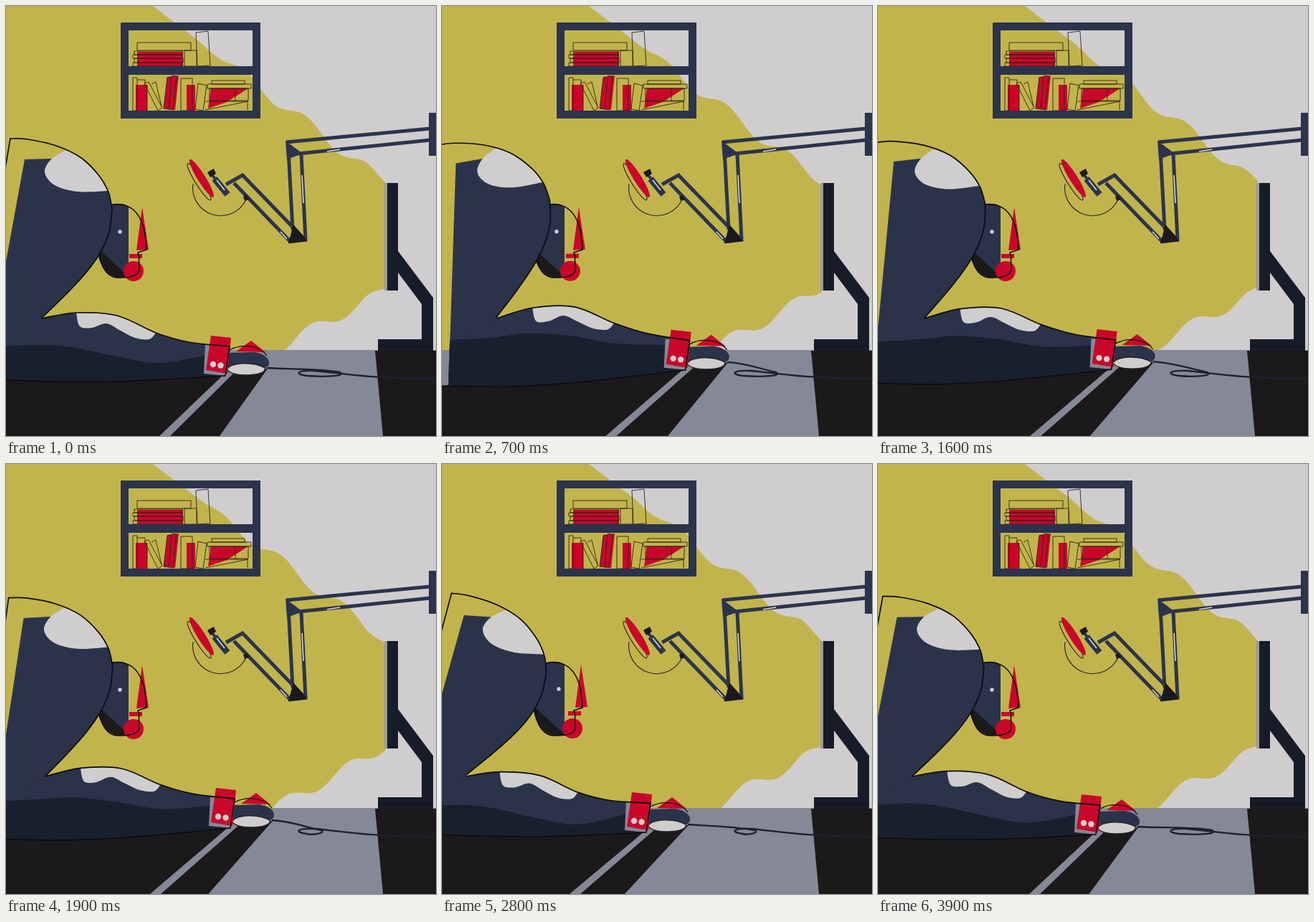
An HTML page that plays this animation: 600 by 600 pixels, repeating every 4000 ms.

```html
<!DOCTYPE html>
<html lang="en">
<head>
<meta charset="utf-8">
<title>Late at the desk</title>
<style>
html, body { margin: 0; width: 100%; height: 100%; overflow: hidden; background: #d0cdcf; }
svg { display: block; width: 100vw; height: 100vh; }
</style>
</head>
<body>
<svg viewBox="0 0 600 600" fill="none">
  <defs><clipPath id="clip"><path id="spine" d="M26 214L-31 524V700H700V0H26Z"/></clipPath></defs>
  <rect width="600" height="600" fill="#d0cdcf"/>
  <path id="glow" fill="#c2b44c"/>

  <!-- shelf and books -->
  <path fill="#c9062a" d="M183 64H247V84H183ZM181 110H197V146H181ZM225 99L241 97L236 145L220 143ZM252 110H264V146H252ZM286 115H338L308 134L282 143Z"/>
  <g stroke="#2a2618" stroke-width=".9">
    <path d="M183 51H258V62H183ZM179 63H246V68H179ZM177 68H246V73H177ZM179 73H247V79H179ZM177 79H246V84H177ZM249 62H266V84H249ZM265 37L282 35L285 83L267 84Z"/>
    <path d="M177 100H183V146H177ZM183 103H194V110M197 110V146M193 108L199 106L218 142L212 146ZM203 109L209 106L217 140M225 100L231 99L227 144L220 143ZM231 97L238 98L233 145L227 144M244 101H260V146H244ZM268 108L280 111L275 146L264 144Z"/>
    <path d="M287 104H333V109H287ZM281 109H342V115H281ZM284 115H338V132H284ZM278 133H337V145M278 145L338 133M320 115V132"/>
  </g>
  <path fill="#2b344c" fill-rule="evenodd" d="M160 23H355V157H160ZM171 34V84H344V34ZM171 96V146H344V96Z"/>

  <!-- lamp -->
  <path d="M261 248A39 39 0 0 0 335 270" stroke="#2b2b32" stroke-width="1.2"/>
  <g stroke="#2b344c" stroke-width="5">
    <path d="M391 190L592 171M408 206L592 187M394 200L400 312M412 207L418 326"/>
    <path d="M329 235L418 327M318 247L397 329M307 249L332 235M394 329L420 326"/>
    <path d="M291 241L309 263" stroke-width="9"/>
    <path d="M286 234L296 246" stroke-width="4"/>
  </g>
  <path fill="#2b344c" d="M590 149H600V209H590ZM390 188L414 206L392 214Z"/>
  <path fill="#1c191b" d="M401 305L421 328L394 331ZM281 232L290 227L293 234L285 239ZM331 266L336 264L339 270L333 272Z"/>
  <path stroke="#d8d6da" stroke-width="1.6" d="M448 203L466 200M413 236L415 275M383 315L392 325M294 243L305 257"/>
  <g transform="rotate(-32 271 242)">
    <ellipse cx="268" cy="244" rx="5" ry="30" stroke="#2b2b32" stroke-width="1.2"/>
    <ellipse cx="273.500" cy="241.500" rx="5.5" ry="31" fill="#c9062a"/>
  </g>

  <!-- desk and monitor -->
  <rect y="480" width="600" height="120" fill="#858896"/>
  <path fill="#1c191b" d="M515 481H600V600H526Z"/>
  <path id="dark" fill="#1c191b"/>
  <path fill="#9a9aa1" d="M528 247H533V397H528Z"/>
  <path fill="#171c28" d="M532 247H547V397H532ZM547 342L596 407V470H580V416L547 372ZM519 465H596V481H519Z"/>
  <path d="M519 475H596" stroke="#10141d" stroke-width="1.5"/>
  <path id="cable" stroke="#1b2130" stroke-width="2.3"/>

  <!-- head -->
  <path fill="#2b334b" d="M140 279C150 275 163 275 171 280V378C150 382 134 372 130 345Z"/>
  <path fill="#1c191b" d="M128 338L172 378C150 382 133 372 128 345Z"/>
  <g id="face" fill="#c9062a">
    <path d="M190 281L199 340L182 341ZM172 346H190V352H172Z"/>
    <circle cx="178" cy="370" r="14"/>
    <circle cx="159" cy="315" r="2.7" fill="#d0cdcf"/>
  </g>
  <path stroke="#0c0c10" stroke-width="1.6" d="M140 280C158 273 186 274 194 318L196 340L184 344L186 350C184 356 187 360 186 368C185 376 176 379 160 379C143 380 132 367 130 343"/>

  <!-- torso, arm and hand -->
  <g id="torso">
    <path id="coat" fill="#2b334b"/>
    <path id="shoulder" fill="#d0cdcf"/>
    <path id="back" stroke="#0c0c10" stroke-width="1.7"/>
  </g>
  <g clip-path="url(#clip)">
    <path id="arm" fill="#2b334b"/>
    <path id="shade" fill="#18202d"/>
  </g>
  <path id="sleeve" fill="#d0cdcf"/>
  <g id="hand">
    <path fill="#2b334b" d="M308 484L345 483C358 484 368 491 367 499C366 506 352 509 340 509L308 508Z"/>
    <path fill="#c9062a" d="M321 482L342 467L362 483Z"/>
    <path fill="#d0cdcf" stroke="#23251f" stroke-width="1.4" d="M308 507C315 497 345 496 361 505C363 511 352 515 335 515C320 515 312 512 308 507Z"/>
    <path stroke="#0c0c10" stroke-width="1.2" d="M312 480C328 471 354 473 364 488"/>
    <path fill="#858896" d="M278 473L312 475L306 516L276 513Z"/>
    <path fill="#c9062a" d="M286 460L314 463L309 513L279 508Z"/>
    <g fill="#d0cdcf"><circle cx="289" cy="500" r="4.2"/><circle cx="299.500" cy="501.500" r="4.2"/></g>
  </g>
  <path id="line" stroke="#0c0c10" stroke-width="1.7" stroke-linejoin="round"/>
</svg>
<script>
const LOOP = 4000, STEP = 100;
const $ = id => document.getElementById(id);
const draw = (id, d) => $(id).setAttribute('d', d);
const turn = (id, v) => $(id).setAttribute('transform', v);
const clamp = x => Math.max(0, Math.min(1, x));
const pulse = (t, mid, w) => clamp(2 - Math.abs(t - mid) / w);

// Key moments: time, arm sway, hand lift, shadow shift
const KEYS = [
  [0, 0, 0, 0], [400, 24, -6, 10], [1100, 36, -9, 14], [1900, 7, -8, -13],
  [2800, -21, -2, -36], [3300, -4, 2, -14], [3900, -2, 1, -3]
];

// Smooth cyclic curve through one column of the keys
function at(col, t) {
  const n = KEYS.length;
  const T = i => KEYS[(i + n) % n][0] + Math.floor(i / n) * LOOP;
  const V = i => KEYS[(i + n) % n][col];
  const slope = i => {
    const a = T(i) - T(i - 1), b = T(i + 1) - T(i);
    return (b * (V(i) - V(i - 1)) / a + a * (V(i + 1) - V(i)) / b) / (a + b);
  };
  let i = n - 1;
  while (T(i) > t) i--;
  const h = T(i + 1) - T(i), k = (t - T(i)) / h, k2 = k * k, k3 = k2 * k;
  return (2 * k3 - 3 * k2 + 1) * V(i) + (k3 - 2 * k2 + k) * h * slope(i)
    + (3 * k2 - 2 * k3) * V(i + 1) + (k3 - k2) * h * slope(i + 1);
}

const points = s => s.split(', ').map(p => p.split(' ').map(Number));
const pt = p => p[0].toFixed(2) + ' ' + p[1].toFixed(2);

// Smooth curve through the points, continuing from the first one
function curve(p) {
  let d = '';
  for (let i = 0; i < p.length - 1; i++) {
    const a = p[i - 1] || p[i], b = p[i], c = p[i + 1], e = p[i + 2] || c;
    d += 'C' + pt([b[0] + (c[0] - a[0]) / 6, b[1] + (c[1] - a[1]) / 6]) + ' '
      + pt([c[0] - (e[0] - b[0]) / 6, c[1] - (e[1] - b[1]) / 6]) + ' ' + pt(c);
  }
  return d;
}

const BACK = points('6 185, 30 186, 70 195, 105 212, 130 237, 143 260, 148 284');
const FRONT = points('148 284, 144 315, 131 345, 110 374, 82 404, 49 436');
const PATCH = points('143 258, 100 259, 68 250, 54 232, 63 214, 84 201');
const ARM = points('49 436, 98 428, 155 432, 209 456, 255 469, 312 475');
const UNDER = points('306 516, 240 520, 150 524, 70 524, -10 522');
const SLEEVE = points('209 456, 200 465, 180 463, 160 453, 140 443, 120 449, 103 447, 98 428');
const SHADE = points('-60 478, 40 473, 90 476, 150 488, 210 498, 277 488');

// The torso is rigid and only turns
draw('coat', `M26 214L${pt(BACK[3])}${curve(BACK.slice(3))}${curve(FRONT)}V515H-29Z`);
draw('shoulder', `M${pt(BACK[3])}${curve(BACK.slice(3, 6))}L${pt(PATCH[0])}${curve(PATCH)}Z`);
draw('back', `M-34 420L${pt(BACK[0])}${curve(BACK)}${curve(FRONT)}`);

// Light from the screen: ripples run outward along both edges
function glow(t) {
  const WAVE = 88, shift = -t / 560 * WAVE;
  const ripple = (x, peak) =>
    9 * clamp((550 - x) / 50) * Math.cos(2 * Math.PI * (x - peak - shift) / WAVE);
  let d = 'M0 0H205';
  for (let x = 205; x <= 530; x += 5)
    d += 'L' + pt([x, .76 * (x - 205) + clamp((x - 260) / 80) * ripple(x, 375)]);
  for (let x = 530; x >= 340; x -= 5)
    d += 'L' + pt([x, 396 + .54 * (530 - x) + ripple(x, 470)]);
  return d + 'V520H0Z';
}

function render(t) {
  const sway = at(1, t), lift = at(2, t), cast = at(3, t);
  const nod = pulse(t, 1100, 225) + pulse(t, 2800, 225);

  // The arm slides with the sway, bows in the middle and lifts at the hand
  const move = (list, bow, tilt = 0) => list.map(([x, y]) => {
    const k = clamp((x - 49) / 257);
    return [x + sway * (.8 + .2 * k), y + lift * k + bow * Math.sin(Math.PI * k) + tilt * (1 - k)];
  });
  const bow = .3 * lift - .2 * sway, sag = lift - .35 * sway;
  const top = move(ARM, bow), under = move(UNDER, 0, .25 * sway);
  const sleeve = move(SLEEVE, bow), shade = move(SHADE, sag, sag / 2);
  under.push([-99, under[4][1]]);
  const bottom = 'L' + pt(under[0]) + curve(under);

  draw('glow', glow(t));

  const x = n => n + sway, y = n => n + lift;
  draw('dark', `M-10 ${under[4][1]}L${x(303)} ${y(515)}L${214 + cast} 600H-10Z`
    + `M${x(319)} ${y(511)}L${x(365)} ${y(506)}L${298 + 1.2 * cast} 600H${229 + cast}Z`);

  const w = 470 - 30 * pulse(t, 2400, 450);
  draw('cable', `M${x(364)} ${y(505)}C${x(394)} ${y(507)} ${w - 28} 506 ${w - 4} 511`
    + `C${w + 6} 516 ${w - 22} 518 420 516C402 514 405 508 430 509C470 512 500 520 600 520`);

  const tilt = `rotate(${-.252 * sway} 60 262)`;
  turn('torso', tilt);
  turn('spine', tilt);
  turn('face', `translate(${4 * nod} ${-nod})`);
  turn('hand', `translate(${sway} ${lift})`);

  const edge = `M${pt(top[0])}${curve(top)}${bottom}`;
  draw('arm', edge + 'Z');
  draw('line', edge);
  draw('shade', `M${pt(shade[0])}${curve(shade)}${bottom}Z`);
  draw('sleeve', `M${pt(top[1])}${curve(top.slice(1, 4))}${curve(sleeve)}Z`);
}

const start = performance.now();
function tick() {
  const t = (performance.now() - start) % LOOP;
  render(Math.floor(t / STEP) * STEP);
  requestAnimationFrame(tick);
}
tick();
</script>
</body>
</html>
```
